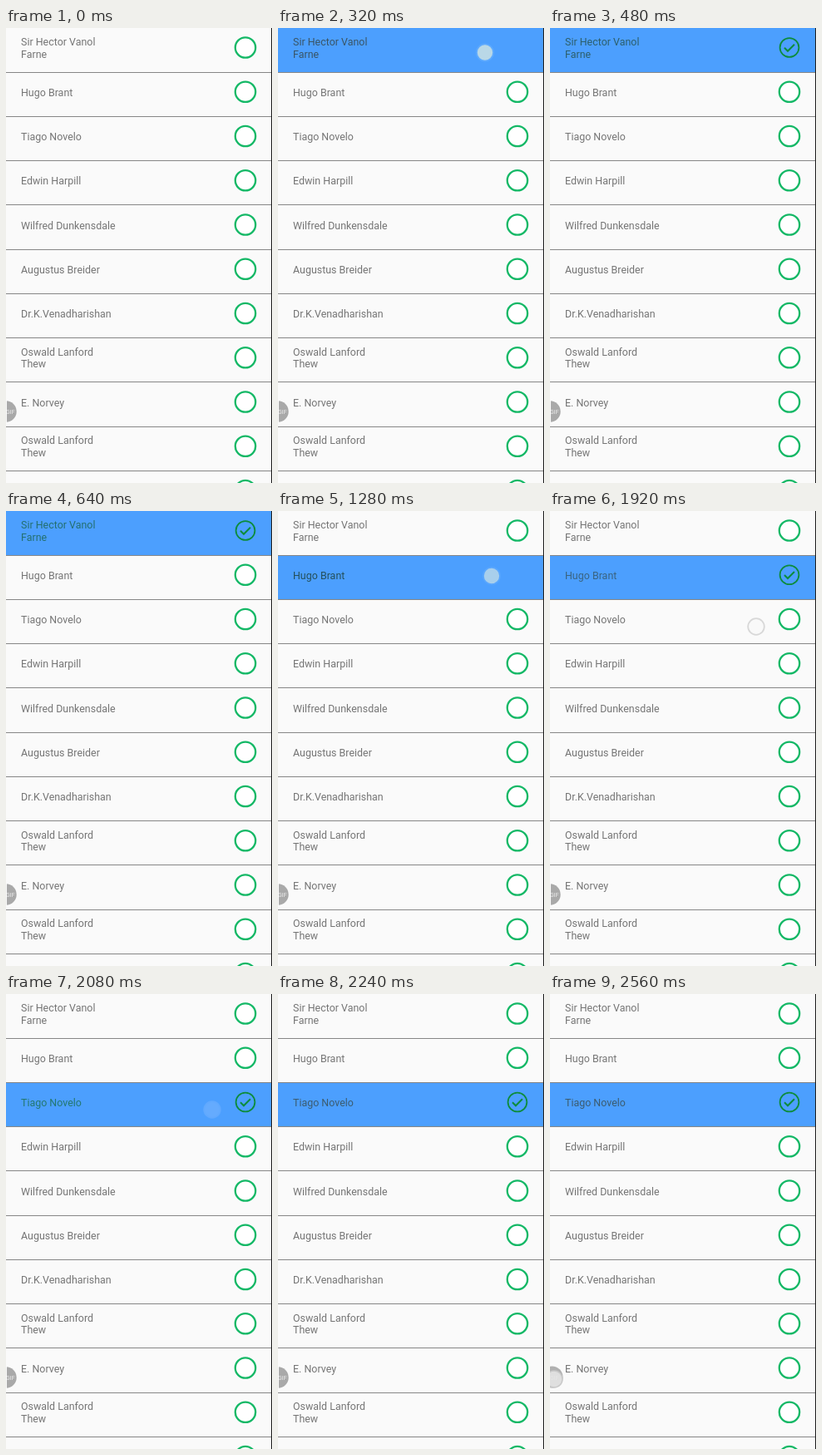
Animation, 320 px wide and 547 px high, one loop 2720 ms. Source, as an HTML page:

```html
<!DOCTYPE html>
<html lang="en">
<head>
<meta charset="utf-8">
<title>Single choice list</title>
<style>
html, body { margin: 0; width: 100%; height: 100%; overflow: hidden; background: #fafafa; }
svg { display: block; width: 100%; height: 100%; }
text { font: 12.45px Roboto, sans-serif; }
</style>
</head>
<body>
<svg id="stage" viewBox="0 0 320 547"></svg>
<script>
const PITCH = 53.25, LOOP = 2720, BLUE = '#4c9ffe', GREEN = '#0d8c3c';
const names = [
  ['Sir Hector Vanol', 'Farne'], ['Hugo Brant'], ['Tiago Novelo'], ['Edwin Harpill'],
  ['Wilfred Dunkensdale'], ['Augustus Breider'], ['Dr.K.Venadharishan'],
  ['Oswald Lanford', 'Thew'], ['E. Norvey'], ['Oswald Lanford', 'Thew'], []
];

// Each step: start time, selected row, its text colour, checked, touch dot
const steps = [
  { at: 0, row: -1 },
  { at: 320, row: 0, ink: '#3a5566', touch: [249, 29.5, 9.3, '#b9d8e7', '#5ca9ff'] },
  { at: 480, row: 0, ink: '#2d5f6b', checked: true },
  { at: 640, row: 0, ink: '#24706f', checked: true },
  { at: 1280, row: 1, ink: '#24505a', touch: [257, 78, 9.3, '#a8cfec', '#58a6fe'] },
  { at: 1440, row: 1, ink: '#3a6480', checked: true },
  { at: 1920, row: 1, ink: '#3a6480', checked: true, touch: [248, 139, 9, '#f9f9f9', '#d8d8d8'] },
  { at: 2080, row: 2, ink: '#24786f', checked: true, touch: [248, 139, 9, '#65abfe', '#61a9fe'] },
  { at: 2240, row: 2, ink: '#3c5c70', checked: true },
  { at: 2560, row: 2, ink: '#3c5c70', checked: true, pressed: true }
];

const circle = (x, y, r, fill, stroke = 'none', width = 0) =>
  `<circle cx="${x}" cy="${y}" r="${r}" fill="${fill}" stroke="${stroke}" stroke-width="${width}"/>`;
const rect = (x, y, w, h, fill) =>
  `<rect x="${x}" y="${y}" width="${w}" height="${h}" fill="${fill}"/>`;

function radio(y, selected, checked) {
  if (!selected) return circle(288, y, 12.2, '#fff', '#14b866', 2.3);
  if (!checked) return '';
  return circle(288, y, 11.4, 'none', GREEN, 1.8) +
    `<path d="M282 ${y + .3}l4 4 8-8" fill="none" stroke="${GREEN}" stroke-width="2"/>`;
}

function listRow(lines, i, step) {
  const top = i * PITCH, line = Math.floor(top + 53), selected = i === step.row;
  const first = top + (lines.length > 1 ? 21 : 28.7);
  const label = lines.map((words, n) =>
    `<text x="18" y="${Math.round(first + n * 14.5)}" fill="${selected ? step.ink : '#757575'}">${words}</text>`);
  return (selected ? rect(0, line - 52, 319, 52, BLUE) + (i ? '' : rect(0, 0, 319, 1, BLUE)) : '') +
    label.join('') + radio(top + 23.5, selected, step.checked) +
    rect(0, line, 319, 1, '#868686');
}

function bubble(pressed) {
  const label = '<text x="0" y="463.5" fill="#eee" style="font-size:7px">GIF</text>';
  const edge = rect(0, 447, 1, 28, '#fafafa');
  if (!pressed) return circle(0, 461, 12.7, '#a9a9a9') + label + edge;
  return circle(2.5, 460.5, 13, '#b0b0b0') + label +
    circle(5, 463, 10, '#e6e6e6dd', '#c8c8c8', 1.5);
}

const touchDot = ([x, y, r, fill, halo]) =>
  circle(x, y, r + .8, fill, halo, 1.8);

const stage = document.getElementById('stage');
let shown;

function frame() {
  const time = performance.now() % LOOP;
  const step = steps.findLast(s => s.at <= time);
  if (step !== shown) {
    shown = step;
    stage.innerHTML = rect(0, 0, 320, 547, '#fafafa') +
      names.map((lines, i) => listRow(lines, i, step)).join('') +
      bubble(step.pressed) +
      (step.touch ? touchDot(step.touch) : '') +
      rect(319, 0, 1, 547, '#1c1c1c');
  }
  requestAnimationFrame(frame);
}
frame();
</script>
</body>
</html>
```
